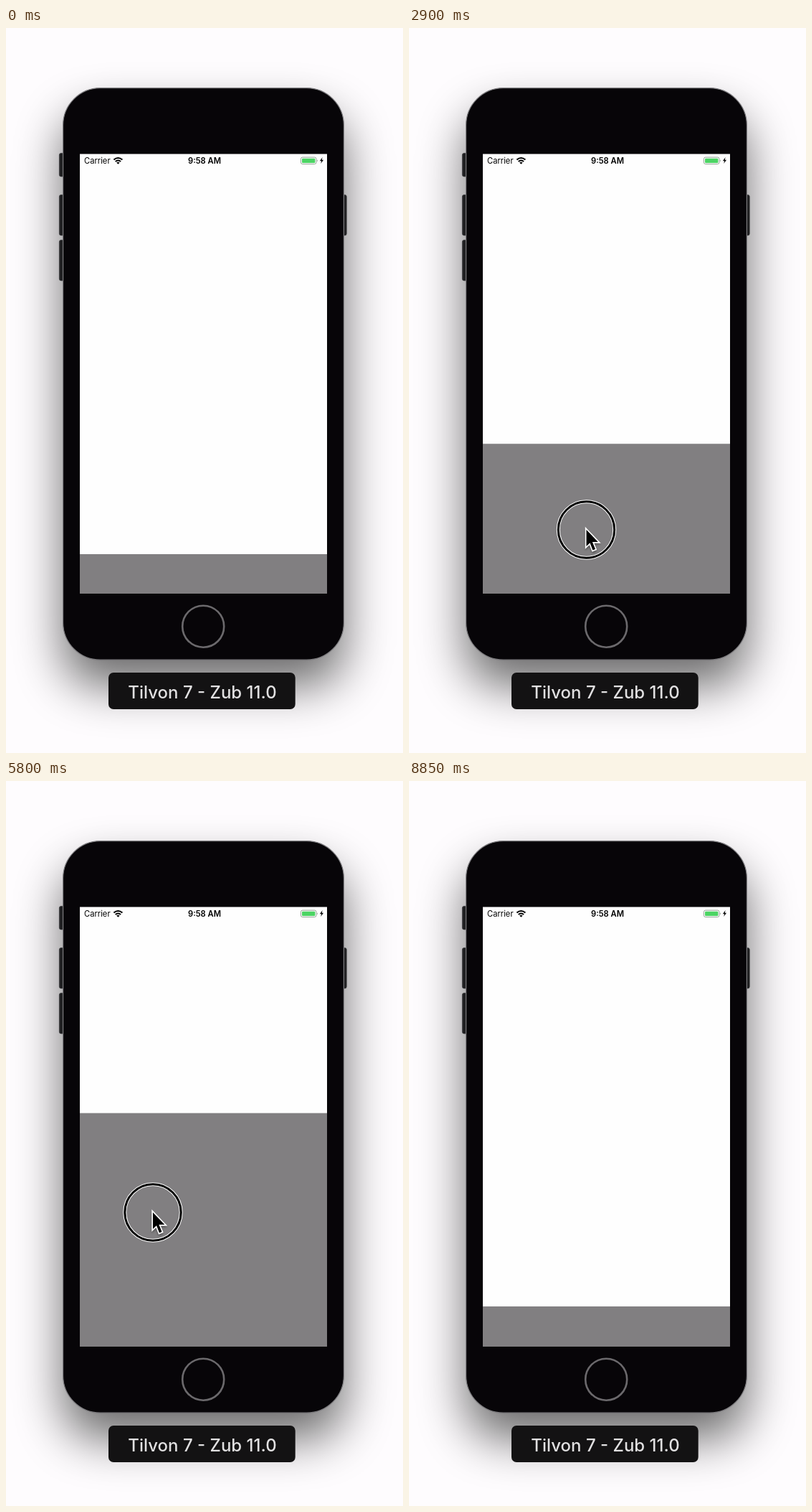
These frames come from a looping animation (554 px wide and 1010 px high, 8.9 s). An HTML page:

```html
<!DOCTYPE html>
<html lang="en">
<head>
<meta charset="utf-8">
<title>Sliding sheet</title>
<style>
  html, body { margin: 0; width: 100%; height: 100%; overflow: hidden; background: #fefcfe; }
  svg { display: block; width: 100%; height: 100%; }
  text { font-family: Inter, Roboto, sans-serif; }
</style>
</head>
<body>
<svg viewBox="0 0 554 1010">
  <defs>
    <filter id="blur" x="-50%" y="-30%" width="200%" height="160%">
      <feGaussianBlur stdDeviation="33"/>
    </filter>
    <filter id="soft" x="-50%" y="-50%" width="200%" height="200%">
      <feGaussianBlur stdDeviation="1.5"/>
    </filter>
    <path id="arrow" d="M0 0V23L5 18.3 9 28.5 12.5 27 8.4 17H16.3Z"/>
    <rect id="key" width="8" height="56.5" rx="2.5"/>
  </defs>

  <rect width="554" height="1010" fill="#fefcfe"/>
  <rect x="79" y="120" width="393" height="797" rx="52" opacity=".57" filter="url(#blur)"/>

  <g fill="#202022" stroke="#39393b" stroke-width=".8">
    <rect x="74.4" y="174.4" width="8" height="32.5" rx="2.5"/>
    <use href="#key" x="74.4" y="232.4"/>
    <use href="#key" x="74.4" y="295.4"/>
    <use href="#key" x="467.2" y="232.4"/>
  </g>
  <rect x="79.6" y="83.6" width="391.8" height="796.6" rx="52" fill="#070508" stroke="#7c7b7e" stroke-width="1.2"/>
  <circle cx="275.2" cy="833.7" r="29" fill="none" stroke="#6b696c" stroke-width="2.6"/>

  <rect x="103" y="175.5" width="345" height="612.5" fill="#fefefe"/>
  <rect id="sheet" x="103" width="345" fill="#817f81"/>

  <g font-size="11.2">
    <text x="109" y="189">Carrier</text>
    <text x="277" y="189" text-anchor="middle" font-weight="600">9:58 AM</text>
  </g>
  <path d="M150.4 183.6Q156.4 178.3 162.4 183.6M152.7 186.1Q156.4 182.9 160.1 186.1" fill="none" stroke="#000" stroke-width="2"/>
  <path d="M154.2 187.5Q156.4 185.8 158.6 187.5L156.4 189.8Z"/>
  <rect x="411.4" y="180.1" width="21.6" height="9.4" rx="2.4" fill="#fff" stroke="#8a998c" stroke-width=".9"/>
  <rect x="413" y="181.7" width="18.4" height="6.2" rx="1" fill="#4cd464"/>
  <path d="M434.2 183.2Q436 184.8 434.2 186.4Z" fill="#8a998c"/>
  <path d="M441.6 180L437.9 185.2H440.2L439.2 189 443 183.7H440.7Z"/>

  <rect x="143" y="898" width="260.7" height="51" rx="7" fill="#131213"/>
  <text x="274" y="934" font-size="24" font-weight="500" text-anchor="middle" fill="#e1e0e1">Tilvon 7 - Zub 11.0</text>

  <g id="cursor">
    <g id="ring" fill="none">
      <circle r="39.2" stroke="#fff" stroke-width="5"/>
      <circle r="39.2" stroke="#000" stroke-width="3"/>
    </g>
    <use href="#arrow" y="2" opacity=".4" stroke="#000" stroke-width="3" filter="url(#soft)"/>
    <use href="#arrow" stroke="#fff" stroke-width="3.4" paint-order="stroke"/>
  </g>
</svg>
<script>
  const LOOP = 8900, STEP = 50;
  const OPEN = 328, CLOSED = 733, BOTTOM = 788;
  const SPRING = 7.65;

  // Pointer poses; down means the button is held until the next pose.
  const poses = [
    { t: 0, x: -30, y: 850 },
    { t: 950, x: 230, y: 755, down: true },
    { t: 1300, x: 231.5, y: 480 },
    { t: 2400, x: 244, y: 448, down: true },
    { t: 2900, x: 247.5, y: 699, down: true },
    { t: 3970, x: 259.5, y: 710 },
    { t: 5400, x: 203, y: 765, down: true },
    { t: 5550, x: 204, y: 673 },
    { t: 5800, x: 205, y: 601, down: true },
    { t: 6200, x: 246.5, y: 548 },
    { t: 7450, x: 246.5, y: 548, down: true },
    { t: 7850, x: 250, y: 700 },
    { t: 8850, x: 470, y: 690 }
  ];

  const byId = id => document.getElementById(id);
  const sheet = byId('sheet'), cursor = byId('cursor'), ring = byId('ring');
  const mix = (a, b, k) => a + (b - a) * k;
  const smooth = p => p * p * (3 - 2 * p);

  // A free pointer rests for half of the gap, then glides to the next pose.
  function pointer(t) {
    const i = poses.findIndex(pose => pose.t > t);
    if (i < 1) return null;
    const a = poses[i - 1], b = poses[i];
    const p = (t - a.t) / (b.t - a.t);
    const k = smooth(a.down ? p : Math.max(0, 2 * p - 1));
    return { x: mix(a.x, b.x, k), y: mix(a.y, b.y, k), down: a.down };
  }

  // The sheet follows a drag, then springs on in the drag's direction.
  function sheetTop(t) {
    const i = poses.findLastIndex(pose => pose.down && pose.t < t);
    if (i < 0) return CLOSED;
    const from = poses[i], to = poses[i + 1];
    const grabbed = sheetTop(from.t) - from.y;
    if (t < to.t) return grabbed + pointer(t).y;
    const rest = to.y < from.y ? OPEN : CLOSED;
    const s = SPRING * (t - to.t) / 1000;
    return mix(rest, grabbed + to.y, (1 + s) * Math.exp(-s));
  }

  function draw(now) {
    const t = Math.floor(now % LOOP / STEP) * STEP;
    const top = sheetTop(t), p = pointer(t);
    sheet.setAttribute('y', top);
    sheet.setAttribute('height', BOTTOM - top);
    cursor.style.display = p ? '' : 'none';
    if (!p) return;
    cursor.setAttribute('transform', `translate(${p.x} ${p.y})`);
    ring.style.display = p.down ? '' : 'none';
  }

  const start = performance.now();
  function tick() {
    draw(performance.now() - start);
    requestAnimationFrame(tick);
  }
  tick();
</script>
</body>
</html>
```
